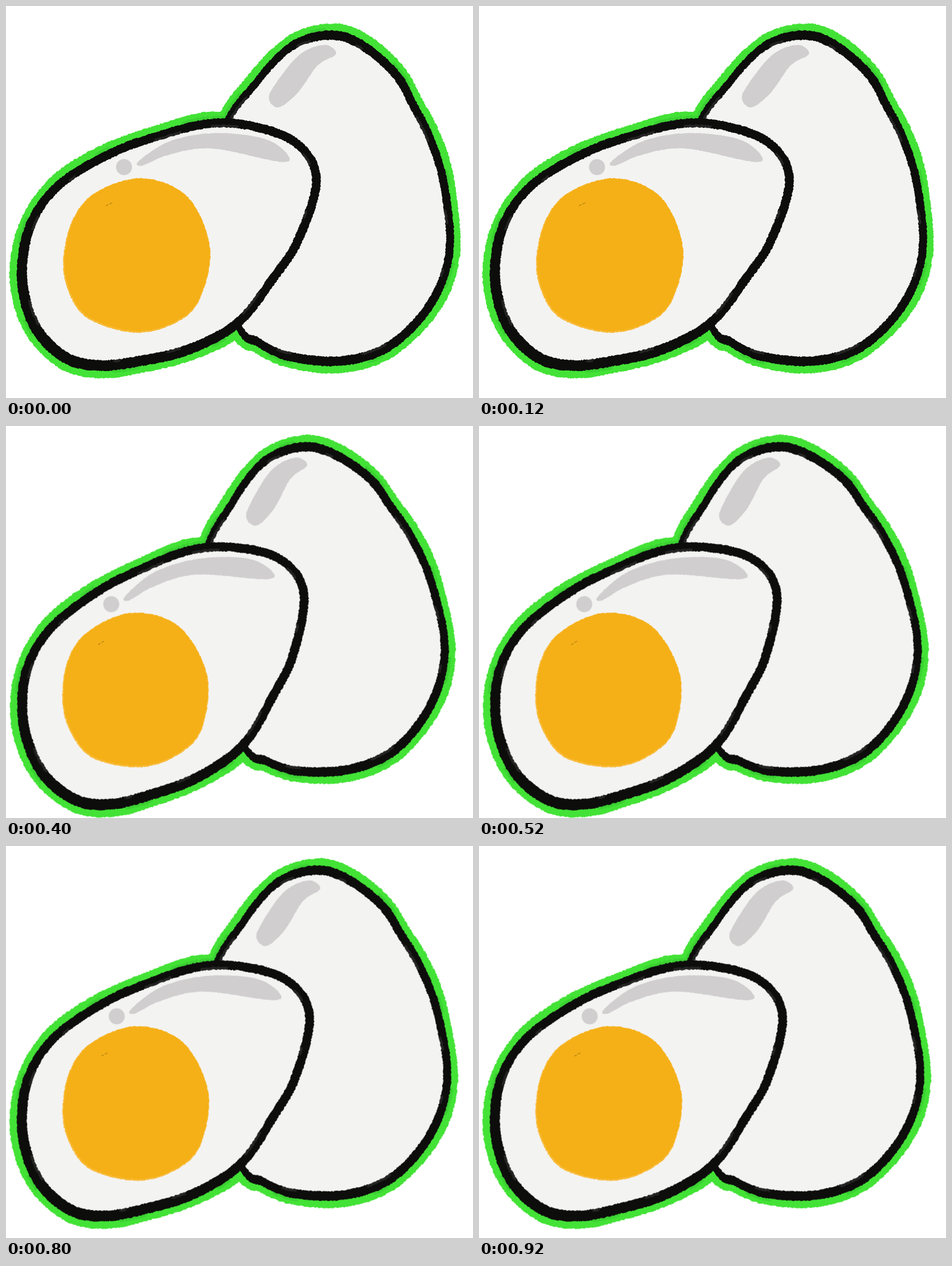
Recreate the animation shown at these times as an HTML page. Size 817 px wide and 685 px high, loop 1000 ms.

```html
<!DOCTYPE html>
<html lang="en">
<head>
<meta charset="utf-8">
<title>Eggs</title>
<style>
  html, body { margin: 0; width: 100%; height: 100%; overflow: hidden; background: #fff; }
  svg { display: block; width: 100%; height: 100%; }
  #eggs { transform-origin: 431px 473px; }
</style>
</head>
<body>
<svg viewBox="0 0 817 685"><g id="eggs"></g></svg>
<script>
const eggs = document.getElementById('eggs');
const green = '#43e236', ink = '#0d0d0c', white = '#f3f3f2', shine = '#d0cecf';

let seed = 11;
const rand = () => (seed = (seed * 16807) % 2147483647) / 2147483647 - 0.5;

function spline(a, b, c, d, t) {
  return b + 0.5 * t * (c - a + t * (2 * a - 5 * b + 4 * c - d + t * (3 * (b - c) + d - a)));
}

// Smooth closed curve through clockwise key points, sampled about every 2 px
function curve(text) {
  const keys = text.split(' ').map(p => p.split(',').map(Number));
  const n = keys.length, out = [];
  for (let i = 0; i < n; i++) {
    const [a, b, c, d] = [-1, 0, 1, 2].map(k => keys[(i + k + n) % n]);
    const steps = Math.ceil(Math.hypot(c[0] - b[0], c[1] - b[1]) / 2);
    for (let s = 0; s < steps; s++) {
      out.push([0, 1].map(k => spline(a[k], b[k], c[k], d[k], s / steps)));
    }
  }
  return out;
}

// Path pushed outward by offset(nx, ny, i), with a grainy edge
function trace(points, offset, rough) {
  const n = points.length;
  const path = points.map(([x, y], i) => {
    const p = points[(i + n - 2) % n], q = points[(i + 2) % n];
    const len = Math.hypot(q[0] - p[0], q[1] - p[1]) || 1;
    const nx = (q[1] - p[1]) / len, ny = (p[0] - q[0]) / len;
    const d = offset(nx, ny, i) + rand() * rough;
    return (x + nx * d).toFixed(1) + ' ' + (y + ny * d).toFixed(1);
  });
  return 'M' + path.join('L') + 'Z';
}

function add(tag, attrs) {
  const el = document.createElementNS('http://www.w3.org/2000/svg', tag);
  for (const name in attrs) el.setAttribute(name, attrs[name]);
  eggs.append(el);
}

const fill = (d, color, extra) => add('path', { d, fill: color, ...extra });
const smudge = (d, color, dashes) =>
  add('path', { d, fill: 'none', stroke: color, 'stroke-width': 9, 'stroke-dasharray': dashes });
const blob = (text, rough) => trace(curve(text), () => 0, rough);

// One centre line gives the rim, the ink line and the white
function egg(text, width) {
  const mid = curve(text);
  const half = (nx, ny) => width(nx, ny) / 2;
  return {
    rim: trace(mid, (nx, ny, i) => half(nx, ny) + 12 + Math.sin(i / 19), 2),
    line: trace(mid, half, 1.6),
    white: trace(mid, (nx, ny) => -half(nx, ny), 1.6)
  };
}

const back = egg(
  '390,196 432,141 480,86 525,58 583,52 634,76 684,122 712,172 742,232 764,301 777,405 ' +
  '765,475 735,532 690,580 640,609 570,621 490,611 440,587 408,562 345,420 352,290',
  (nx, ny) => 12.5 + 4 * ny * ny + 1.5 * nx);
back.shine = blob('577,84 558,68 515,84 472,135 460,162 477,177 510,152 545,104', 0.8);

const front = egg(
  '358,205 440,212 512,243 543,305 512,407 468,475 405,554 320,600 230,621 160,628 ' +
  '100,612 48,555 28,470 44,380 95,311 185,257 270,226',
  (nx, ny) => 15.5 + 4 * Math.max(0, 0.8 * ny - 0.6 * nx));
front.shine = blob('233,270 290,235 370,222 455,233 494,262 478,272 360,249 285,260 238,279', 0.8);

for (const { rim } of [back, front]) fill(rim, green);
for (const { line } of [back, front]) smudge(line, '#3bd232', '50 170 28 140');
for (const { line, white: body, shine: gloss } of [back, front]) {
  fill(line, ink);
  smudge(body, '#242424', '50 130 26 85 14 160');
  fill(body, white);
  fill(gloss, shine);
}
add('circle', { cx: 206.5, cy: 281.5, r: 14, fill: shine });

const yolk = blob(
  '240,301 318,334 357,422 340,510 300,552 230,571 150,550 114,510 100,450 116,375 158,325', 1.4);
fill(yolk, '#f8ba38');
fill(yolk, '#f5b017', { transform: 'translate(290 340) scale(.988) translate(-290 -340)' });
add('path', { d: 'M175 349l4-2m2-1l5-2', stroke: '#a87a12', 'stroke-width': 1.3 });

const turns = [0, 3, -7.25, 3.15, -4];
const frames = [...turns, turns[0]].map((deg, i) => ({
  offset: i / turns.length,
  transform: `rotate(${deg}deg)`,
  easing: 'step-end'
}));
eggs.animate(frames, { duration: 1000, iterations: Infinity });
</script>
</body>
</html>
```
